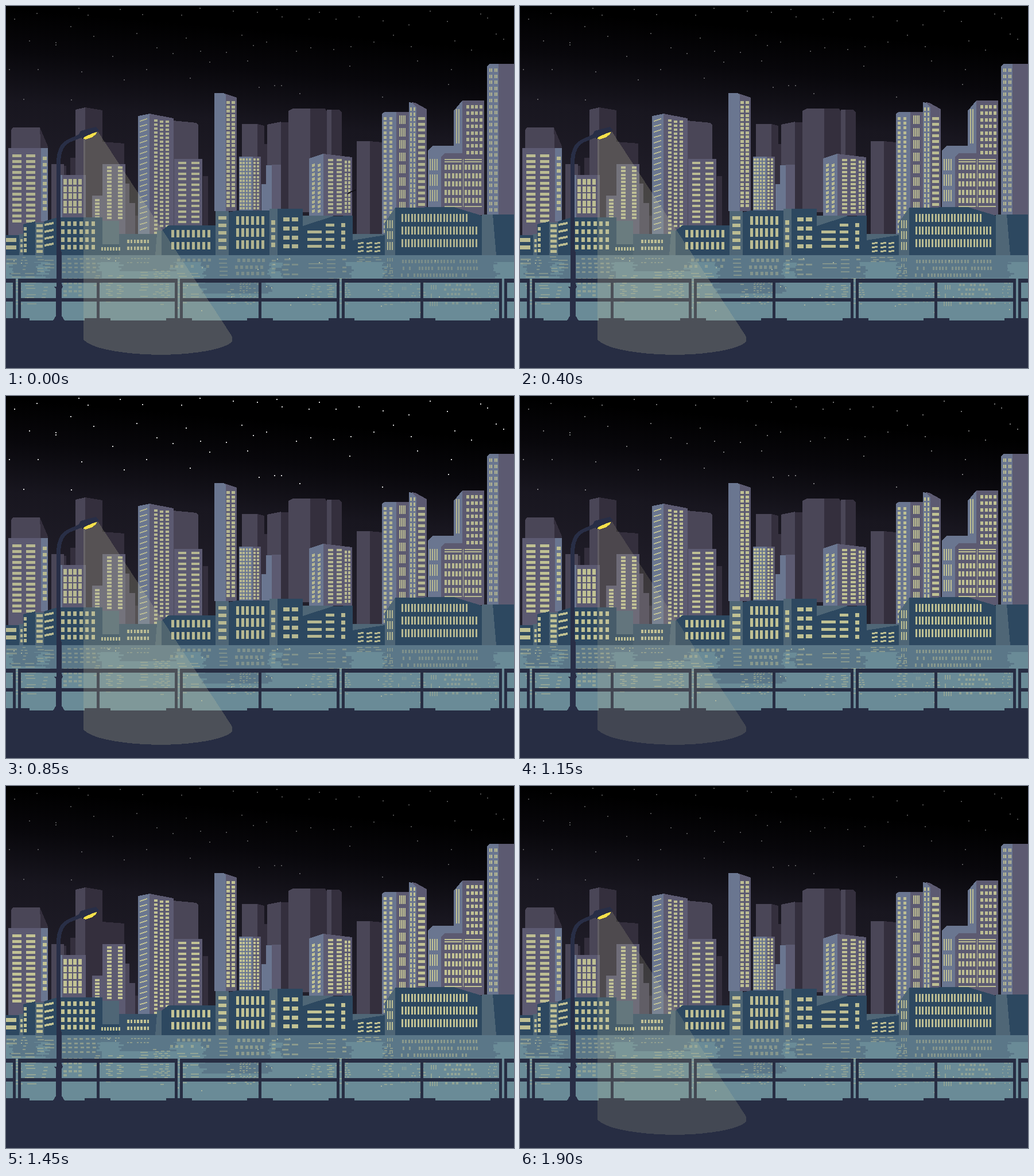
An HTML page for the animation above (2050 ms loop, 885x632 px).

```html
<!DOCTYPE html>
<html lang="en">
<head>
<meta charset="utf-8">
<title>Night skyline</title>
<style>
html, body { margin: 0; width: 100%; height: 100%; overflow: hidden; background: #000; }
svg { display: block; width: 100vw; height: 100vh; }
</style>
</head>
<body>
<svg id="stage" viewBox="0 0 885 632" preserveAspectRatio="none" shape-rendering="crispEdges">
  <defs>
    <linearGradient id="sky" gradientUnits="userSpaceOnUse" x1="430" y1="40" x2="400" y2="400">
      <stop offset="0" stop-color="#000"/>
      <stop offset=".2" stop-color="#08070b"/>
      <stop offset=".45" stop-color="#18161f"/>
      <stop offset="1" stop-color="#24212d"/>
    </linearGradient>
  </defs>
  <rect width="885" height="440" fill="url(#sky)"/>
</svg>
<script>
const stage = document.getElementById('stage');
const BACK = '#4a4657', SHADE = '#342f3d', FRONT = '#5c5a71', SIDE = '#6a7690';
const DARK = '#2d4860', PALE = '#4f6676', WATER = '#6a8b97', DEEP = '#5b7788', IRON = '#272d43';

function path(d, fill) {
  const el = document.createElementNS('http://www.w3.org/2000/svg', 'path');
  el.setAttribute('d', d);
  el.setAttribute('fill', fill);
  stage.appendChild(el);
  return el;
}
const poly = (fill, points) => path('M' + points + 'Z', fill);
const box = (x, y, w, h) => `M${x} ${y}h${w}v${h}h${-w}z`;
const block = (fill, x0, y0, x1, y1) => path(box(x0, y0, x1 - x0, y1 - y0), fill);

let seed = 7;
function rnd() {
  seed = (seed * 16807) % 2147483647;
  return seed / 2147483647;
}

// Windows gather in d; panes are kept for the mirror image in the water.
let d = '';
const panes = [];
function grid(x, y, cols, rows, dx, dy, w, h, rise = 0) {
  for (let r = 0; r < rows; r++) for (let c = 0; c < cols; c++) {
    const px = +(x + c * dx).toFixed(1), py = +(y + r * dy).toFixed(1);
    d += rise ? `M${px} ${py}l${w} ${-rise}v${h}l${-w} ${rise}z` : box(px, py, w, h);
    panes.push([px, py, w, h]);
  }
}
const lit = [];
function flush() {
  lit.push(path(d, '#b0b28e'));
  d = '';
}

// Stars
const starAt = [
  14,22, 53,12, 126,3, 142,15, 198,5, 237,14, 305,15, 337,3, 395,8, 437,10, 471,5, 480,18,
  527,22, 545,10, 574,22, 614,18, 656,25, 701,32, 738,8, 768,26, 826,13, 838,20, 853,48, 866,57,
  810,76, 781,60, 705,70, 674,50, 640,62, 600,70, 570,75, 530,72, 505,78, 453,62, 430,68, 410,50,
  383,80, 354,97, 338,78, 313,55, 290,82, 262,72, 227,47, 185,87, 152,52, 112,35, 86,63, 86,67,
  40,60, 55,110, 5,110, 131,114, 30,162, 113,163, 205,128, 244,110, 320,125, 420,95, 440,141,
  467,138, 479,138, 511,152, 598,104, 655,158, 716,95, 770,136, 775,110
];
let dots = '';
for (let i = 0; i < starAt.length; i += 2) dots += box(starAt[i], starAt[i + 1], 1.5, 1.5);
const stars = path(dots, '#fff');

// Far towers
poly(BACK, '9 217L12 212L59 212L62 250L9 250');
poly(SHADE, '59 212L73 245V260H61');
block(SHADE, 112, 265, 122, 400);
block(BACK, 79, 276, 101, 400);
block(SHADE, 101, 279, 105, 400);
poly(BACK, '121 181L138 177V400H121');
poly(SHADE, '138 177L168 182V400H138');
poly(SHADE, '168 237L206 240V400H168');
poly(BACK, '291 200L332 204L335 208V385H291');
block(SHADE, 343, 297, 352, 385);
block(BACK, 411, 206, 438, 360);
poly(SHADE, '438 206L450 209V360H438');
block(SHADE, 444, 241, 456, 360);
poly(BACK, '455 207L479 202V360H455');
block(SHADE, 479, 203, 492, 360);
poly(BACK, '492 183L500 179H530V360H492');
poly(SHADE, '530 179H556L559 184V360H530');
block(BACK, 559, 181, 567, 300);
poly(SHADE, '567 181H580L585 185V300H567');
block(BACK, 611, 236, 634, 400);
poly(SHADE, '634 236L655 238V400H634');
block('#4b475a', 207, 310, 215, 400);
block('#4b475a', 215, 344, 225, 400);
block(SHADE, 225, 366, 230, 400);

// Middle towers
block(FRONT, 4, 248, 61, 405);
block(SIDE, 61, 248, 73, 378);
block(FRONT, 61, 376, 90, 405);
grid(11, 259, 2, 13, 24, 9.5, 16, 5);
grid(64, 263, 1, 9, 0, 11, 7, 6);

block(SIDE, 95, 295, 98, 372);
block(FRONT, 98, 295, 139, 372);
grid(100, 302, 4, 5, 8.7, 12.6, 6, 10);

block(FRONT, 150, 331, 168, 372);
grid(155, 337, 1, 6, 0, 6, 8, 3.5);
block(FRONT, 168, 276, 208, 400);
grid(176, 280, 2, 15, 18.5, 6.3, 8, 4);

poly(SIDE, '230 192L250 188V398H230');
poly(FRONT, '250 188L292 196V398H250');
grid(233, 200, 1, 21, 0, 9.5, 13, 2, 4);
grid(258, 198, 1, 29, 0, 7, 6, 4);
grid(268, 200, 2, 27, 10, 7, 6, 4);

block(FRONT, 293, 267, 342, 385);
grid(300, 272, 2, 12, 23, 9.4, 14, 4);

poly(SIDE, '363 152H379L384 155V358H363');
poly(FRONT, '379 152L402 160V358H383V155');
grid(384, 166, 2, 25, 9, 7.5, 6, 5);

block(SIDE, 406, 263, 430, 358);
block(FRONT, 430, 263, 444, 358);
grid(407, 266, 4, 15, 5.4, 6.1, 3.5, 4);
grid(431, 266, 2, 15, 6, 6.1, 4, 4);

block(SIDE, 445, 311, 453, 358);
block(SIDE, 453, 278, 463, 358);
block(FRONT, 463, 277, 479, 358);

poly(SIDE, '528 266L553 258V366H528');
poly(FRONT, '553 258L603 264V366H553');
grid(533, 276, 2, 11, 10, 8, 5, 5, 1);
grid(561, 267, 2, 14, 15, 7, 9, 4);
grid(590, 270, 2, 13, 6, 7.2, 4, 5);

poly(SIDE, '655 188L660 185H680V398H655');
block(FRONT, 680, 185, 702, 360);
grid(658, 194, 2, 25, 10, 8.2, 5, 5);
grid(685, 191, 4, 8, 3, 21.6, 1.6, 15);
poly(SIDE, '702 168L715 170V360H702');
poly(FRONT, '706 168L713 169L733 180V360H715V176');
grid(704, 177, 2, 20, 5.5, 8.9, 3, 6);
grid(718, 194, 1, 16, 0, 10, 12, 5);

poly(SIDE, '735 252L743 244H782V365H735');
poly(SIDE, '780 183L795 165V258H780');
block(FRONT, 795, 165, 833, 262);
poly(FRONT, '758 263L764 257H833V365H758');
grid(738, 267, 4, 3, 4, 27, 2, 20);
grid(784, 180, 2, 1, 4, 0, 1.5, 60);
grid(802, 173, 4, 8, 7.5, 11.4, 5, 6);
grid(764, 267, 2, 2, 35, 4, 30, 1.5);
grid(764, 277, 5, 5, 6.3, 14.6, 4, 9);
grid(799, 277, 5, 5, 6.3, 14.6, 4, 9);
grid(795.5, 267, 1, 1, 0, 0, 1.5, 84);
grid(764, 349, 2, 1, 35, 0, 30, 1.5);

poly(SIDE, '838 105L843 101H858V365H838');
block(FRONT, 858, 101, 885, 365);
grid(842, 109, 2, 24, 8.5, 10.6, 2, 6);
grid(845, 109, 2, 24, 8.5, 10.6, 2, 6);
flush();

// Low waterfront blocks
block(PALE, 22, 398, 34, 435);
block(DARK, 0, 400, 23, 435);
poly(DARK, '30 381L51 376V435H30');
block(PALE, 51, 378, 66, 435);
poly(DARK, '66 376L90 369V435H66');
grid(0, 405, 1, 2, 0, 13, 18, 7);
grid(25, 407, 1, 3, 0, 9, 4, 5);
grid(31, 386, 1, 5, 0, 9.5, 5, 6);
grid(53, 381, 1, 6, 0, 9, 11, 5);
grid(67, 380, 1, 4, 0, 12, 16, 4, 3);

poly(PALE, '168 375H197V435H163V400');
block(DARK, 90, 369, 168, 435);
block(DARK, 163, 416, 200, 435);
grid(96, 376, 6, 4, 10.5, 13.8, 6, 8);
grid(166, 421, 7, 1, 5, 0, 2.5, 6);

poly(PALE, '197 398H271V435H197');
poly('#385168', '197 398H263L260 435H197');
grid(211, 408, 7, 2, 5.8, 11.5, 3.5, 6);

block(PALE, 263, 392, 273, 435);
poly(DARK, '271 392L283 383H365V435H271');
grid(288, 391, 8, 2, 9, 21, 5, 13);

block(PALE, 365, 358, 388, 435);
poly(DARK, '388 360L402 357H459V435H388');
block(PALE, 459, 354, 474, 435);
block(DARK, 473, 354, 517, 435);
grid(370, 367, 1, 5, 0, 13, 14, 6);
grid(401, 367, 6, 3, 8.7, 21, 5, 15);
grid(462, 374, 1, 4, 0, 13, 7, 8);
grid(483, 369, 2, 4, 15, 15.8, 11, 7);

poly(PALE, '517 366H570L560 384H517');
poly(DARK, '517 384L570 367L604 366V435H517');
grid(525, 392, 1, 3, 0, 12.5, 25, 5);
grid(557, 380, 1, 4, 0, 12.4, 15, 5);
grid(584, 379, 1, 4, 0, 12.5, 7, 7);

block(PALE, 604, 398, 660, 435);
poly(DARK, '604 409L660 400V435H604');
grid(613, 413, 3, 3, 14.5, 7, 10, 3, 1);

poly(PALE, '660 378L678 352V435H660');
poly(DARK, '678 352L780 351L829 366V435H678');
grid(664, 374, 3, 3, 4, 19, 2, 14);
grid(689, 363, 21, 1, 5.6, 0, 3, 14);
grid(689, 385, 24, 2, 5.6, 21.5, 3, 14);

block(PALE, 829, 364, 855, 435);
poly(DARK, '848 364H885V435H854');
flush();

// Water with ragged building shadows and mirrored panes
block(WATER, 0, 435, 885, 560);
let shadow = box(0, 435, 885, 12);
function ragged(x0, x1, y1) {
  for (let y = 445; y < y1; y += 3) {
    const a = x0 + rnd() * 16, b = x1 - rnd() * 16;
    shadow += box(a.toFixed(1), y, (b - a).toFixed(1), 3);
  }
}
ragged(0, 64, 472);
ragged(62, 172, 484);
ragged(190, 300, 462);
ragged(334, 466, 500);
ragged(468, 606, 474);
ragged(655, 864, 474);
path(shadow, DEEP);

for (const [x, y, w, h] of panes) {
  const my = 435 + (435 - y - h) * 0.55;
  if (my > 520 || w > 26 || h > 30 || rnd() < (my > 478 ? 0.35 : 0.12)) continue;
  const shift = Math.sin(my * 0.9) * 2;
  d += box((x + shift).toFixed(1), Math.round(my), w, Math.max(1.5, h * 0.4));
}
flush();
const mirror = lit.pop();

let glints = '';
for (let i = 0; i < 34; i++) glints += box(Math.round(rnd() * 880), Math.round(440 + rnd() * 100), 1.5, 1.5);
path(glints, '#a9b59f');

// Railing and quay
let rail = box(0, 549, 885, 83);
for (const [a, b] of [[0, 17], [21, 299], [303, 581], [585, 864], [868, 885]]) {
  rail += box(a, 476, b - a, 7) + box(a, 510, b - a, 6);
  if (a) rail += box(a, 476, 5, 74);
  if (b < 885) rail += box(b - 5, 476, 5, 74);
  if (b - a > 100) rail += box((a + b) / 2 - 2.5, 480, 5, 70);
}
for (let x = 18; x < 885; x += 141.4) rail += box(Math.round(x - 22), 545, 45, 6);
path(rail, IRON);

// Light cone, then the lamp
const cone = path('M135 231L160 219L392 574Q397 582 392 588Q370 603 300 608Q262 610 225 607Q150 600 135 582Z', 'rgb(197,195,156)');
path('M88 490V275Q88 243 106 234L127 224L130 218L157 211L161 216L158 221L134 232L131 230L111 238Q95 246 95 275V424L97 430V484L99 490L97 494V541L102 549H82L87 541V494L84 490Z', '#282e46');
poly('#f4e04a', '134 231L138 228L151 222L158 220L157 224L150 229L139 233');

const streak = path('M594 328L598 325L609 320L610 322L600 326L595 329Z', '#121017');

const LOOP = 2050;
const beam = [1, 1, 1, 1, 1, 1, .86, .7, .52, 0, .16, .45, .75];
const glow = [0, .35, .35, .3, .25, .2, .4, .55, .75, .65, 1, .75, .45];
const twinkle = [.3, .3, .32, .36, .6, .85, .62, .45, .3, .3, .3, .3, .3];

function draw(t) {
  const i = t < 100 ? 0 : t < 400 ? 1 : Math.min(12, 2 + Math.floor((t - 400) / 150));
  const g = glow[i], mix = (a, b) => Math.round(a + (b - a) * g);
  const tint = `rgb(${mix(177, 205)},${mix(179, 204)},${mix(143, 151)})`;
  for (const el of lit) el.setAttribute('fill', tint);
  mirror.setAttribute('fill', tint);
  mirror.setAttribute('opacity', 0.36 + 0.16 * g);
  stars.setAttribute('opacity', twinkle[i]);
  cone.setAttribute('opacity', 0.235 * beam[i]);
  streak.setAttribute('opacity', i ? 0 : 1);
}

const start = performance.now();
function tick() {
  draw((performance.now() - start) % LOOP);
  requestAnimationFrame(tick);
}
tick();
</script>
</body>
</html>
```
